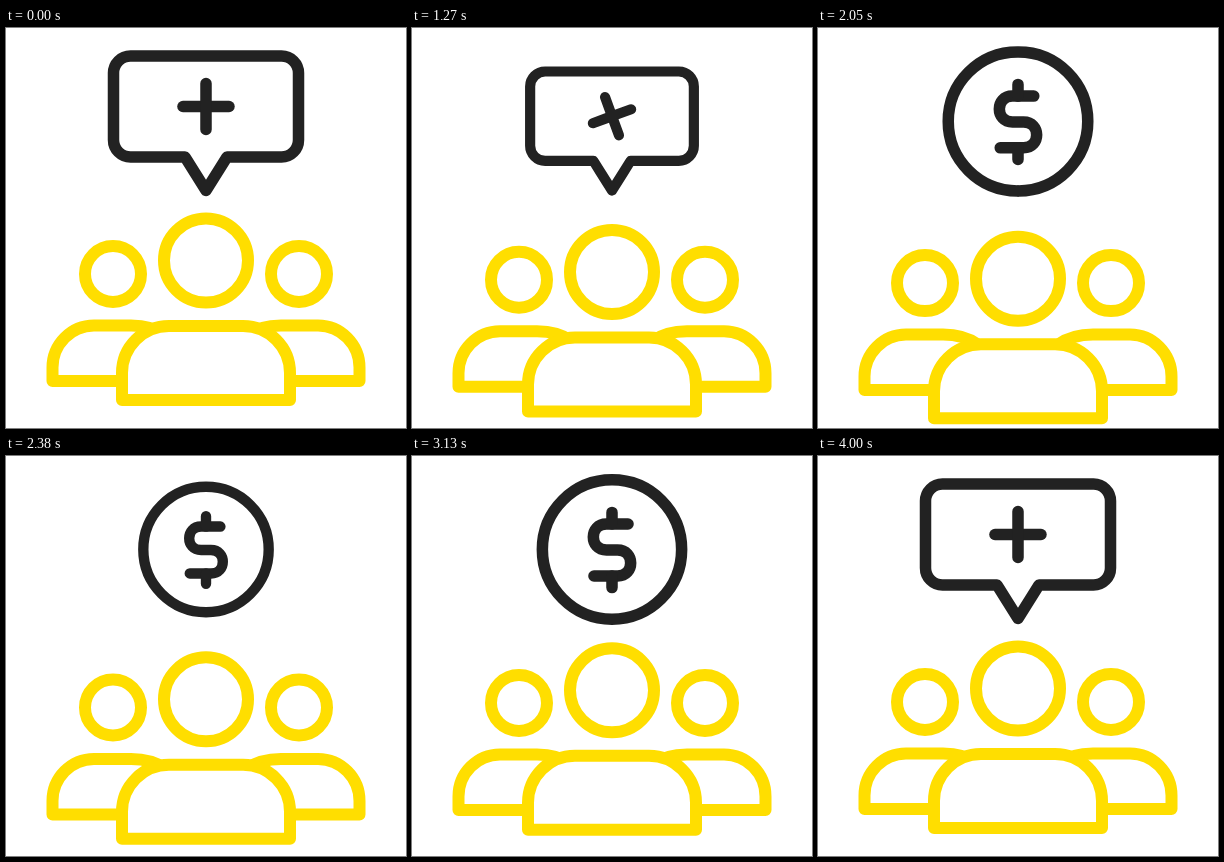
Write an HTML page that moves like this. It is 400 px wide and 400 px high and loops after 4.03 s.

```html
<!DOCTYPE html>
<html lang="en">
<head>
<meta charset="utf-8">
<title>Team benefits icon</title>
<style>
  html, body { margin: 0; width: 100%; height: 100%; overflow: hidden; background: #fff; }
  svg { display: block; width: 100%; height: 100%; }
  path, circle { stroke-linecap: round; stroke-linejoin: round; }
</style>
</head>
<body>
<svg viewBox="0 0 400 400">
  <g fill="#fff" stroke="#ffde00" stroke-width="12">
    <g id="sides">
      <g id="side">
        <circle cx="107" cy="246" r="28"/>
        <path d="M160 307.5C150 300.5 138 297.5 125 297.5H88C65 297.5 46.5 316.5 46.5 339.5V353H125"/>
      </g>
      <use href="#side" transform="translate(400 0) scale(-1 1)"/>
    </g>
    <g id="lead">
      <circle cx="200" cy="232.5" r="42"/>
      <path d="M116 372V345C116 319 137 298 163 298H237C263 298 284 319 284 345V372Z"/>
    </g>
  </g>
  <g id="ink" fill="none" stroke="#222">
    <path id="frame"/>
    <path id="curve"/>
    <path id="bar"/>
  </g>
</svg>
<script>
const LOOP = 4030, HOLD = 1030, STEP = 30;
const TIP = 163, COIN_Y = 93.5, COIN_R = 69.5, FLIP = 3360, INK = 11.5;
const el = id => document.getElementById(id);
const lerp = (a, b, k) => a + (b - a) * k;
const span = (t, a, b) => Math.min(1, Math.max(0, (t - a) / (b - a)));
const smooth = u => u * u * (3 - 2 * u);
const mix = (p, q, k) => [lerp(p[0], q[0], k), lerp(p[1], q[1], k)];

// Eased value through [time, value] keys
function keyed(t, keys) {
  let value = keys[0][1];
  for (let i = 1; i < keys.length; i++) {
    const [a] = keys[i - 1], [b, v] = keys[i];
    value = lerp(value, v, smooth(span(t, a, b)));
  }
  return value;
}

// Timing curve with control points (x1, 0) and (x2, 1)
function bezierEase(u, x1, x2) {
  let lo = 0, hi = 1;
  for (let i = 0; i < 24; i++) {
    const k = (lo + hi) / 2, n = 1 - k;
    if (3 * x1 * k * n * n + 3 * x2 * k * k * n + k ** 3 < u) lo = k; else hi = k;
  }
  return lo * lo * (3 - 2 * lo);
}

// Speech bubble: right half from the tip upwards, then mirrored
const half = [[21, 129], [75.5, 129], [92.5, 112], [92.5, 45], [75.5, 28]];
const mirrored = half.map(([x, y]) => [-x, y]).reverse();
const bubble = [[0, TIP - .5], ...half, ...mirrored];
// Where each point lands on the coin, in quarter turns from the bottom
const quarters = [0, 0, 0, 1, 1, 2, 2, 3, 3, 4, 4, 4];
const corners = new Set([2, 4, 6, 8]);

function bubbleSegment(i) {
  const a = bubble[i], b = bubble[(i + 1) % bubble.length];
  if (!corners.has(i)) return [a, mix(a, b, 1 / 3), mix(a, b, 2 / 3), b];
  const corner = [Math.sign(a[0]) * 92.5, a[1] > 78 ? 129 : 28];
  return [a, mix(a, corner, .55), mix(b, corner, .55), b];
}

function coinSegment(i) {
  const a = quarters[i] * Math.PI / 2, b = quarters[i + 1] * Math.PI / 2;
  const h = 4 / 3 * Math.tan((b - a) / 4);
  const at = (ang, d) => [
    COIN_R * (Math.sin(ang) + d * Math.cos(ang)),
    COIN_Y + COIN_R * (Math.cos(ang) - d * Math.sin(ang))
  ];
  return [at(a, 0), at(a, h), at(b, -h), at(b, 0)];
}

const segments = bubble.map((_, i) => [bubbleSegment(i), coinSegment(i)]);
const scaleFrom = ([x, y], s, cy) => [x * s, cy + (y - cy) * s];

// Horizontal stroke of the plus, and the S it turns into
const plusX = [-23, -23, -23, -18, -8, 8, 18, 23, 23, 23];
const dollar = [[16, -26], [-5.5, -26], [-23, -26], [-23, 0], [-5.5, 0],
                [5.5, 0], [23, 0], [23, 26], [5.5, 26], [-18, 26]];

function draw(t) {
  const drop = 20.2 * (smooth(span(t, 1000, 1495)) - bezierEase(span(t, 1800, 3900), .25, .2));
  el('lead').setAttribute('transform', `translate(0 ${drop})`);
  el('sides').setAttribute('transform', `translate(0 ${drop / 2})`);

  const s = keyed(t, [[1000, 1], [1270, .885], [1530, 1.074], [2100, 1],
                      [2380, .902], [2640, 1.06], [3190, 1]]);
  const m = t < FLIP ? smooth(span(t, 1645, 2070)) : 0;
  const flip = t < FLIP ? 1 - span(t, 3150, FLIP) ** 2
                        : 1 - (1 - span(t, FLIP, 3830)) ** 2.5;
  const pt = ([x, y]) => `${(200 + x * flip).toFixed(2)} ${y.toFixed(2)}`;
  el('ink').setAttribute('stroke-width', INK * s);

  let d = '';
  segments.forEach(([from, to], i) => {
    const p = from.map((v, j) => pt(mix(scaleFrom(v, s, TIP), scaleFrom(to[j], s, COIN_Y), m)));
    d += `${i ? '' : 'M' + p[0]}C${p.slice(1)}`;
  });
  el('frame').setAttribute('d', d + 'Z');

  const q = Math.sqrt(m);
  const cy = lerp(TIP - 84.5 * s, 94, q);
  const turn = keyed(t, [[1000, 0], [1270, -20], [1520, 0]]) * Math.PI / 180;
  const cos = Math.cos(turn), sin = Math.sin(turn);
  const place = ([x, y]) => pt([(x * cos - y * sin) * s, cy + (x * sin + y * cos) * s]);

  const c = plusX.map((x, i) => place(mix([x, 0], dollar[i], m)));
  el('curve').setAttribute('d',
    `M${c[0]}L${c[1]}C${c.slice(2, 5)}L${c[5]}C${c.slice(6, 9)}L${c[9]}`);

  const outer = lerp(23, 37.5, q), inner = 26 * span(m, .4, 1);
  el('bar').setAttribute('d',
    `M${place([0, -outer])}L${place([0, -inner])}M${place([0, inner])}L${place([0, outer])}`);
}

const start = performance.now();
function tick() {
  const t = (performance.now() - start) % LOOP;
  draw(t < HOLD ? 0 : t - (t - HOLD) % STEP);
  requestAnimationFrame(tick);
}
tick();
</script>
</body>
</html>
```
